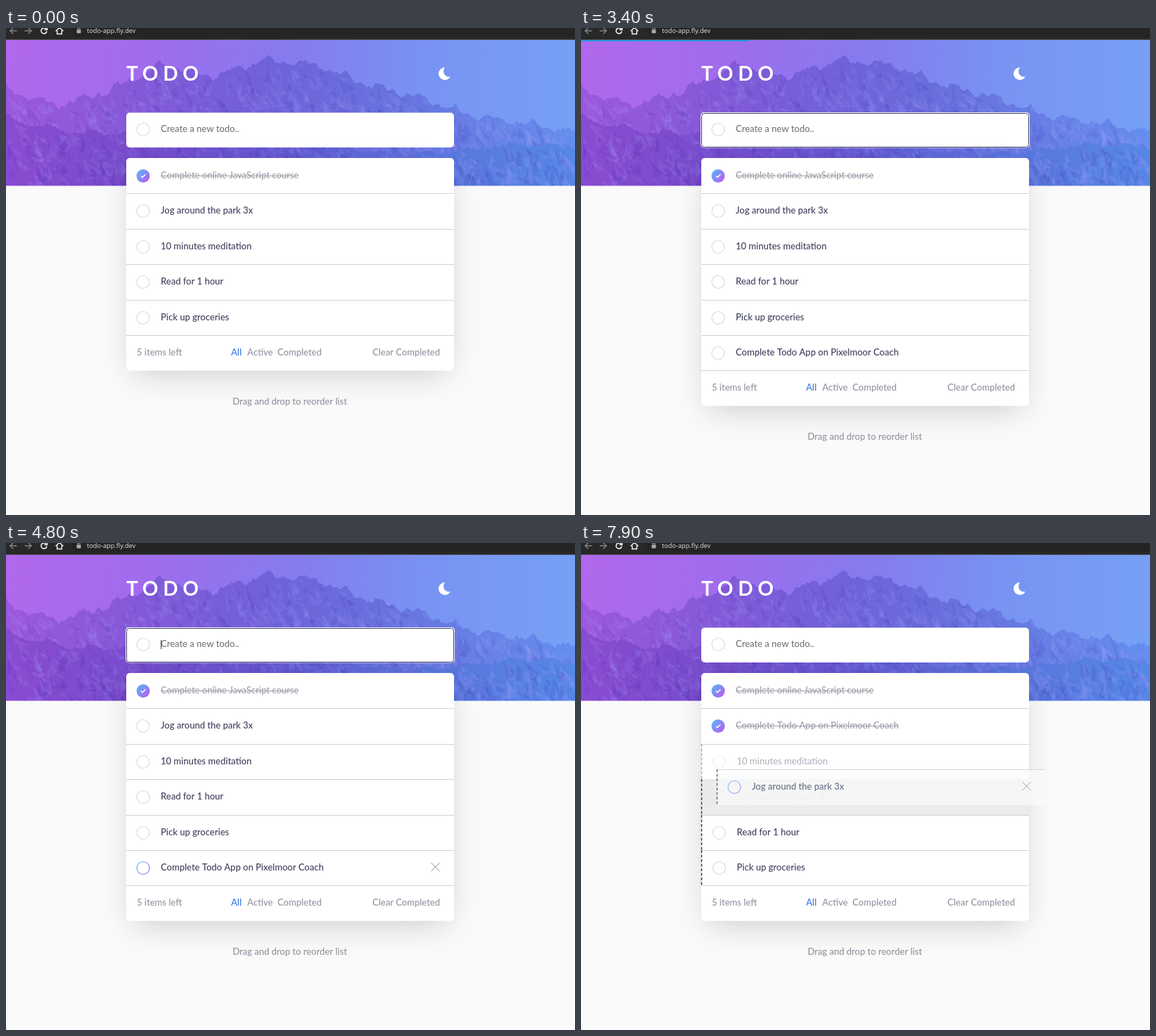
These frames come from a looping animation (809 px wide and 693 px high, 8000 ms). An HTML page with a canvas:

```html
<!DOCTYPE html>
<html lang="en">
<head>
<meta charset="utf-8">
<title>Todo</title>
<style>
  html, body { margin: 0; width: 100%; height: 100%; overflow: hidden; background: #fafafa; }
  canvas { display: block; }
</style>
</head>
<body>
<canvas id="stage" width="809" height="693"></canvas>
<script>
const W = 809, H = 693, LOOP = 8000, TICK = 100;
const HERO_TOP = 17, HERO_END = 224.5;
const LEFT = 171, WIDTH = 466, LIST_TOP = 185, PITCH = 50.4;
const INK = '#3f405e', MUTED = '#9293a1', FADED = '#9c9da8';
const NEW_ITEM = 'Complete Todo App on Pixelmoor Coach';
const FIRST = 'Complete online JavaScript course';
const OPEN = ['Jog around the park 3x', '10 minutes meditation', 'Read for 1 hour', 'Pick up groceries'];

// Moments of the story in ms
const FOCUS = 1100, TYPE = 2400, SUBMIT = 3400, SWEEP_DOWN = 4100, CHECK = 5500, REORDER = 5600,
  SWEEP_UP = 6200, DRAG = 7700, SWAP = 7900;

let c = document.getElementById('stage').getContext('2d');
const clamp = (v, lo = 0, hi = 1) => Math.min(hi, Math.max(lo, v));

function line(points, color, width = 1) {
  c.beginPath();
  points.forEach(([x, y]) => c.lineTo(x, y));
  c.strokeStyle = color;
  c.lineWidth = width;
  c.stroke();
}

function text(str, x, y, color, font = '500 13px Lato, sans-serif', align = 'left') {
  c.font = font;
  c.textAlign = align;
  c.fillStyle = color;
  c.fillText(str, x, y);
  return c.measureText(str).width;
}

function box(x, y, w, h, r, fill) {
  c.beginPath();
  c.roundRect(x, y, w, h, r);
  c.fillStyle = fill;
  c.fill();
}

function gradient(x0, y0, x1, y1, colors) {
  const g = c.createLinearGradient(x0, y0, x1, y1);
  colors.forEach((color, i) => g.addColorStop(i / (colors.length - 1), color));
  return g;
}

function withAlpha(alpha, draw) {
  c.save();
  c.globalAlpha *= alpha;
  draw();
  c.restore();
}

// ---- header scenery and browser bar, painted once ----
let seed = 11;
const random = () => (seed = seed * 16807 % 2147483647) / 2147483647;

// Evenly spaced heights of the skyline, roughened by two folded waves
const SKYLINE = [88, 110, 88, 52, 68, 45, 52, 80, 98, 124, 134, 148];
function farRidge(x) {
  const u = clamp(x / W, 0, .999) * (SKYLINE.length - 1), i = Math.floor(u);
  const base = SKYLINE[i] + (SKYLINE[i + 1] - SKYLINE[i]) * (u - i);
  return base + 9 * Math.abs(Math.sin(x / 17)) + 5 * Math.abs(Math.sin(x / 7)) - 9;
}
const nearRidge = x => 122 + x * .07 + 14 * Math.sin(x / 70) + 7 * Math.abs(Math.sin(x / 19));

function mountain(ridge, colors, facets) {
  c.save();
  c.beginPath();
  c.moveTo(0, HERO_END);
  for (let x = 0; x <= W + 3; x += 3) c.lineTo(x, ridge(x) + random() * 5 - 2);
  c.lineTo(W + 3, HERO_END);
  c.closePath();
  c.fillStyle = gradient(0, 0, W, 0, colors);
  c.fill();
  c.clip();
  for (let i = 0; i < facets; i++) {
    const x = random() * W, depth = random(), top = ridge(x);
    const y = top + depth * (HERO_END - top);
    const lean = random() * 18 - 6, tall = 6 + random() * 20, wide = 3 + random() * 8;
    c.beginPath();
    c.moveTo(x, y);
    c.lineTo(x + lean, y + tall);
    c.lineTo(x + lean + wide, y + tall * .8);
    c.fillStyle = random() < .3 + depth * .4 ? 'rgba(55,35,165,.1)' : 'rgba(175,160,255,.12)';
    c.fill();
  }
  c.restore();
}

function paintScenery() {
  c.fillStyle = '#fafafa';
  c.fillRect(0, 0, W, H);
  c.save();
  c.beginPath();
  c.rect(0, HERO_TOP, W, HERO_END - HERO_TOP);
  c.clip();
  c.fillStyle = gradient(0, 30, W, 90, ['#b168ec', '#a06cee', '#857bef', '#7894f3', '#76a0f5']);
  c.fillRect(0, 0, W, HERO_END);
  mountain(farRidge, ['#9c58dc', '#8259d8', '#6c64da', '#6779e1', '#658eee'], 1100);
  mountain(nearRidge, ['#8a4bd1', '#754dcc', '#6259d1', '#5874dc', '#5688e7'], 800);
  c.restore();

  c.fillStyle = '#282828';
  c.fillRect(0, 0, W, HERO_TOP);
  box(92, -12, W, 25, 12, '#242424');
  line([[0, HERO_TOP - .5], [W, HERO_TOP - .5]], '#4c4c4c');
  c.lineCap = 'round';
  for (const [x, d] of [[10, 1], [32, -1]]) {
    line([[x + 5 * d, 4], [x - 4 * d, 4]], '#858585', 1.4);
    line([[x, 0], [x - 4 * d, 4], [x, 8]], '#858585', 1.4);
  }
  c.beginPath();
  c.arc(54, 4, 4, .3, 5.5);
  c.strokeStyle = '#f2f2f2';
  c.lineWidth = 1.6;
  c.stroke();
  line([[58.5, -1], [58.5, 2.5], [55, 2.5]], '#f2f2f2', 1.5);
  line([[71, 4], [76, -.5], [81, 4]], '#f2f2f2', 1.5);
  line([[72.7, 4], [72.7, 8.5], [79.3, 8.5], [79.3, 4]], '#f2f2f2', 1.5);
  box(100.5, 2.5, 6, 5, 1, '#aaa');
  line([[102, 3], [102, 0], [105, 0], [105, 3]], '#aaa');
  text('todo-app.fly.dev', 115, 7, '#e6e6e6', '9.2px "Open Sans", sans-serif');

  c.letterSpacing = '6.7px';
  text('TODO', 171, 75, '#fff', 'bold 28px Lato, sans-serif');
  c.letterSpacing = '0px';

  // Crescent: a disc with a smaller disc left out
  c.save();
  c.beginPath();
  c.rect(600, 40, 50, 50);
  c.arc(630, 61.5, 8, 0, 7);
  c.clip('evenodd');
  box(615, 56, 18, 18, 9, '#fff');
  c.restore();
}

const scenery = document.createElement('canvas');
scenery.width = W;
scenery.height = H;
const screen = c;
c = scenery.getContext('2d');
paintScenery();
c = screen;

// ---- todo list ----
function check(x, y, done, hover) {
  c.beginPath();
  c.arc(x, y, done ? 9.5 : 9, 0, 7);
  const tint = gradient(x - 8, y - 7, x + 8, y + 7, ['#57b5f4', '#b95cf0']);
  if (done) {
    c.fillStyle = tint;
    c.fill();
    line([[x - 3, y], [x - 1, y + 2.2], [x + 3.3, y - 2.2]], '#fff', 1.5);
  } else {
    c.strokeStyle = hover ? tint : '#d9d9dc';
    c.lineWidth = 1.1;
    c.stroke();
  }
}

function row(x, mid, label, done, hover) {
  check(x + 24, mid + .5, done, hover);
  const width = text(label, x + 49, mid + 4, done ? FADED : INK);
  if (done) line([[x + 49, mid + .5], [x + 49 + width, mid + .5]], FADED);
  if (hover) for (const d of [-6, 6])
    line([[x + 433.5, mid - 1 - d], [x + 445.5, mid - 1 + d]], '#85868f');
}

function dashedEdge(x, top, bottom) {
  c.setLineDash([4, 2.5]);
  line([[x + .5, top], [x + .5, bottom]], '#333448', 1.4);
  c.setLineDash([]);
}

function squiggle(x, width) {
  const points = [];
  for (let i = 0; i * 1.5 <= width; i++) points.push([x + i * 1.5, 150 + (i % 2 ? .8 : -.8)]);
  line(points, '#d8433f', .9);
}

// The pointer sweeps one row per tick, down to the new item and later back up
function hoveredRow(t) {
  if (t < SWEEP_DOWN || t === REORDER || t === 7200) return -1;
  if (t < REORDER) return t < 4800 ? Math.min(4, (t - SWEEP_DOWN) / TICK) : 5;
  if (t < 7200) return clamp(4 - (t - SWEEP_UP) / TICK, 1, 5);
  return 2;
}

function drawInput(t) {
  const typed = t >= TYPE && t < SUBMIT, focused = t >= FOCUS && t < CHECK;
  box(LEFT, 120.5, WIDTH, 49.5, 5, '#fff');
  if (focused) {
    box(LEFT - 1, 120, WIDTH + 2, 50.5, 5, '#fff');
    c.beginPath();
    c.roundRect(LEFT + .5, 121.5, WIDTH - 1, 48, 4);
    c.strokeStyle = '#3c3d63';
    c.lineWidth = 1;
    c.stroke();
  }
  check(195, 144.5);
  const width = text(typed ? NEW_ITEM : 'Create a new todo..', 220, 148, typed ? INK : '#757575');
  if (typed) for (const word of ['Todo', 'Pixelmoor'])
    squiggle(220 + c.measureText(NEW_ITEM.split(word)[0]).width, c.measureText(word).width);
  if (focused && Math.floor((t - FOCUS) / 600) % 2 === 0) {
    const x = Math.round(220 + (typed ? width : 0)) + .5;
    line([[x, 138], [x, 151]], INK);
  }
}

function drawList(t) {
  const drag = t >= DRAG, swapped = t >= SWAP, hover = hoveredRow(t);
  const open = swapped ? [OPEN[1], OPEN[0], ...OPEN.slice(2)] : OPEN;
  const items = t < SUBMIT ? [FIRST, ...open] : t < REORDER ? [FIRST, ...open, NEW_ITEM] : [FIRST, NEW_ITEM, ...open];
  const edge = i => Math.round(LIST_TOP + PITCH * i);
  const middle = i => Math.round(LIST_TOP + PITCH * i + 25);
  const height = PITCH * (items.length + 1);
  const slot = swapped ? 3 : 2;

  c.save();
  c.shadowColor = 'rgba(0,0,0,.2)';
  c.shadowBlur = 44;
  c.shadowOffsetY = 14;
  box(LEFT + 11, LIST_TOP + 11, WIDTH - 22, height - 22, 0, '#fff');
  c.restore();
  box(LEFT, LIST_TOP, WIDTH, height, 5, '#fff');

  items.forEach((label, i) => {
    const top = edge(i), next = edge(i + 1);
    const done = i === 0 || label === NEW_ITEM && t >= CHECK;
    const dragging = drag && i > 1, passing = dragging && swapped && i === 2;
    if (dragging && i === slot) {
      c.fillStyle = '#ebebeb';
      c.fillRect(LEFT, top, WIDTH, next - top);
    }
    line([[LEFT, next + .5], [LEFT + WIDTH, next + .5]], '#d2d2d5');
    withAlpha(passing ? .4 : dragging && i === slot ? .12 : 1, () =>
      row(LEFT + (dragging ? 1.5 : 0), middle(i), label, done, hover === i && !drag));
    if (dragging) withAlpha(passing ? .4 : 1, () => dashedEdge(LEFT, top, next));
  });

  const base = middle(items.length) + 4;
  text('5 items left', 186, base, MUTED);
  text('All', 320, base, '#3a76e8');
  text('Active', 343, base, MUTED);
  text('Completed', 386, base, MUTED);
  text('Clear Completed', 617, base, MUTED, undefined, 'right');
  text('Drag and drop to reorder list', 403.5, base + 70, MUTED, undefined, 'center');

  if (drag) {
    const moved = (t - DRAG + TICK) / (SWAP - DRAG + TICK);
    const x = LEFT + Math.round(22 * moved), y = edge(2) + Math.round(36 * moved);
    box(x, y, WIDTH, 51, 0, 'rgba(250,253,252,.7)');
    withAlpha(.75, () => {
      line([[x, y + .5], [x + WIDTH, y + .5]], '#ccccd0');
      row(x + 1, y + 25, OPEN[0], false, true);
      dashedEdge(x, y, y + 51);
    });
  }
}

// Thin loading bar: eases out to full width, then fades
function drawProgress(t) {
  if (t < SUBMIT) return;
  const u = clamp((t - 3367) / 298);
  withAlpha(clamp((3900 - t) / 200), () => {
    c.fillStyle = '#2299dd';
    c.fillRect(0, HERO_TOP, W * (1 - (1 - u) ** 3), 2);
  });
}

function frame(now) {
  const t = Math.floor(now % LOOP / TICK) * TICK;
  c.drawImage(scenery, 0, 0);
  drawInput(t);
  drawList(t);
  drawProgress(t);
  requestAnimationFrame(frame);
}
requestAnimationFrame(frame);
</script>
</body>
</html>
```
